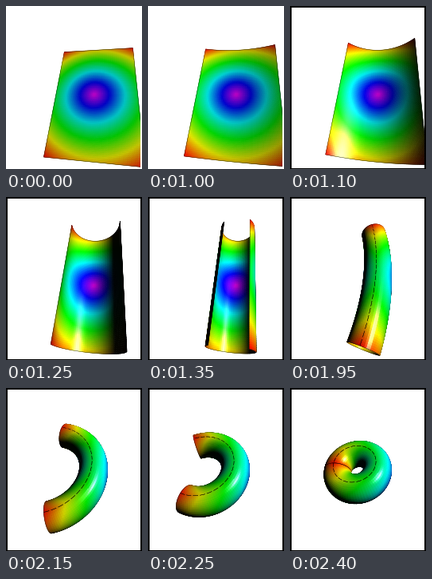
Animation of 171x204 px, one loop 4.4 s. Source, as a matplotlib script:

```python
import numpy as np
import matplotlib.pyplot as plt
from matplotlib.animation import FuncAnimation
from matplotlib.collections import PolyCollection
from matplotlib.colors import hsv_to_rgb
from matplotlib.patches import Rectangle

W, H, DPI = 171, 204, 64
PX = 72 / DPI
STEP = 50
FRAMES = 88
NU, NV = 56, 84
MAJOR = 1.5  # tube radius is 1

# Camera: rows are the world axes in view space (right, down, forward)
AXES = np.array([[.9745, -.0045, -.2238],
                 [.1130, -.8533, .5091],
                 [-.1933, -.5214, -.8311]])
ORIGIN = np.array([1.562, .548, 12.12])
FOCAL = 197
CENTER = np.array([85.9, 102.4])
EYE = -ORIGIN @ AXES.T


def unit(a):
    return a / np.linalg.norm(a, axis=-1, keepdims=True)


LIGHT = unit(np.array([.66, .07, .74]))

us = np.linspace(-np.pi, np.pi, NU + 1)
vs = np.linspace(-np.pi, np.pi, NV + 1)
U, V = np.meshgrid(us, vs)
UC, VC = np.meshgrid((us[1:] + us[:-1]) / 2, (vs[1:] + vs[:-1]) / 2)

dist = np.hypot(UC, MAJOR * VC) / np.hypot(np.pi, MAJOR * np.pi)
ones = np.ones_like(dist)
BASE = hsv_to_rgb(np.stack([.83 * (1 - dist), ones, ones], -1)).reshape(-1, 3)


def surface(u, v, roll, bend):
    """Points of the sheet rolled across and bent along its length."""
    x = np.sin(roll * u) / roll
    z = (1 - np.cos(roll * u)) / roll
    rho = MAJOR / bend
    return np.stack([(rho + x) * np.cos(bend * v) - rho,
                     (rho + x) * np.sin(bend * v), z], -1)


def normals(u, v, roll, bend):
    s = -np.sin(roll * u)
    return np.stack([s * np.cos(bend * v), s * np.sin(bend * v),
                     np.cos(roll * u)], -1)


def project(p):
    q = p @ AXES + ORIGIN
    return CENTER + FOCAL * q[..., :2] / q[..., 2:], np.linalg.norm(q, axis=-1)


def shade(p, n):
    view = unit(EYE - p)
    n = np.where((n * view).sum(-1, keepdims=True) < 0, -n, n)
    diffuse = np.clip(n @ LIGHT, 0, None)[:, None]
    half = unit(view + LIGHT)
    gloss = np.clip((n * half).sum(-1, keepdims=True), 0, None) ** 130
    rgb = BASE * (.02 + diffuse) + .8 * gloss * (diffuse > 0)
    return np.clip(rgb, 0, 1)


def outline(xy, depth, rolled):
    """Short pieces of the sheet's four borders, dashed along a closed seam."""
    segs, deps = [], []
    for side in (np.s_[:, 0], np.s_[:, -1], np.s_[0], np.s_[-1]):
        p, d = xy[side], depth[side]
        keep = np.ones(len(p) - 1, bool)
        if rolled and len(p) == NV + 1:
            keep[3::4] = False
        a, b = p[:-1][keep], p[1:][keep]
        segs.append(np.stack([a, b, b, a], 1))
        deps.append(((d[:-1] + d[1:]) / 2)[keep] - .08)
    return np.concatenate(segs), np.concatenate(deps)


def curvature(t):
    return max(np.tan(np.pi / 4 * np.clip(t, 0, 1)), 1e-4)


fig = plt.figure(figsize=(W / DPI, H / DPI), dpi=DPI, facecolor="white")
ax = fig.add_axes([0, 0, 1, 1])
ax.set_xlim(0, W)
ax.set_ylim(H, 0)
ax.axis("off")
mesh = ax.add_collection(PolyCollection([], zorder=1))
border = ax.add_patch(Rectangle((0, 0), W, H + 1, fill=False, lw=4 * PX,
                                zorder=5, joinstyle="miter"))


def update(i):
    roll = curvature((i - 19) / 10)
    bend = curvature((i - 38) / 10)

    xy, depth = project(surface(U, V, roll, bend))
    quads = np.stack([xy[:-1, :-1], xy[:-1, 1:], xy[1:, 1:], xy[1:, :-1]], 2)
    quads = quads.reshape(-1, 4, 2)
    mid = surface(UC, VC, roll, bend).reshape(-1, 3)
    color = shade(mid, normals(UC, VC, roll, bend).reshape(-1, 3))
    segs, seg_depth = outline(xy, depth, i >= 29)

    far = np.concatenate([project(mid)[1], seg_depth])
    order = np.argsort(-far)
    color = np.concatenate([color, np.zeros((len(segs), 3))])[order]
    width = np.repeat([.7 * PX, .4 * PX], [len(quads), len(segs)])[order]
    mesh.set_verts(np.concatenate([quads, segs])[order])
    mesh.set_facecolor(color)
    mesh.set_edgecolor(color)
    mesh.set_linewidth(width)
    border.set_edgecolor("black" if i >= 22 else "white")
    return mesh, border


anim = FuncAnimation(fig, update, frames=FRAMES, interval=STEP,
                     init_func=lambda: update(0), repeat=True, repeat_delay=0)
plt.show()
```
